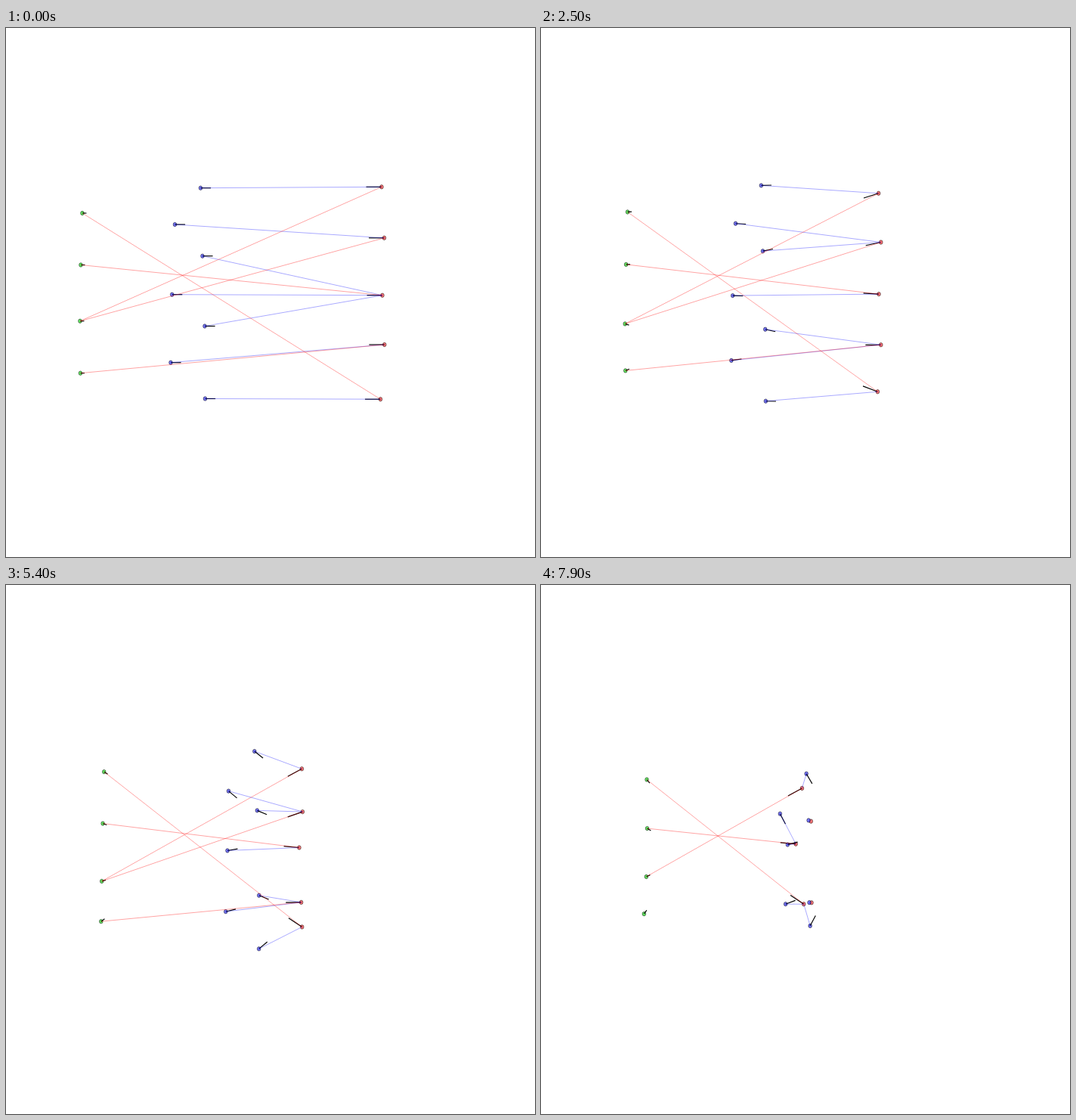
Recreate the animation shown at these times as an HTML page with a canvas. Size 700 by 700 pixels, loop 8 s.

```html
<!DOCTYPE html>
<html>
<head>
<meta charset="utf-8">
<style>
html, body { margin: 0; width: 100%; height: 100%; overflow: hidden; background: #fff; }
canvas { display: block; width: 700px; height: 700px; }
</style>
</head>
<body>
<canvas id="stage" width="700" height="700"></canvas>
<script>
const ctx = document.getElementById('stage').getContext('2d');
const STEPS = 80, STEP_MS = 100, LAST = STEPS - 1;
const ASPECT = 1.17;   // vertical to horizontal scale
const UNIT = 0.68;     // pixels per step at speed 1
const REACH = 5;       // catching distance
const REGROUP = 6;     // step at which the blue agents settle on a quarry

// Each agent: start x, start y, total drop, bow of its path
const green = group(0.8, '0,225,0', [
  [101, 245, 12.5, -55],
  [99, 313.5, 8.6, -29],
  [98, 387.8, -1.8, 75],
  [98.5, 456.7, -21.5, -22]
]);
const blue = group(2, '30,30,255', [
  [257.5, 211.7, 38, -140],
  [223.5, 260, 42.7, -109],
  [260, 301.7, 15.5, -158],
  [219.7, 352.7, -9.1, 45],
  [263, 394.5, 32, 20],
  [218, 442.7, -20.5, -14],
  [263.5, 490.5, -39.5, 140]
]);
// Red agents all turn towards their prey in the same way
const red = group(-3, '255,30,30', [
  [497, 210.3, 58.7],
  [500.5, 277.8, 39.7],
  [498, 353.7, -11],
  [500.8, 419, 1.6],
  [495.5, 491.2, -68.9]
].map(([x, y, drop]) => [x, y, drop, 0.64 * drop]), 0);

const prey = [2, 2, 1, 3, 0];
const firstPick = [0, 1, 2, 2, 2, 3, 4];
const settled = [0, 1, 1, 2, 3, 3, 4];

function group(speed, color, rows, lag = 0.8) {
  return rows.map(([x, y, drop, bow]) => {
    const height = n => {
      const u = n / LAST;
      return y + u * u * (drop + bow * (1 - u - lag * u * (1 - u)));
    };
    return { color, end: Infinity, path: trace(x, height, speed * UNIT) };
  });
}

// Speed is constant, so the vertical motion fixes the sideways motion
function trace(x, height, speed) {
  const path = [];
  const climb = n => height(n + 0.5) - height(n - 0.5);
  const side = vy => Math.sign(speed) * Math.sqrt(Math.max(0, speed ** 2 - (vy / ASPECT) ** 2));
  for (let n = 0; n < STEPS; n++) {
    const vy = n ? climb(n) : 0;
    path.push({ x, y: height(n), vx: side(vy), vy });
    x += side(climb(n + 0.5));
  }
  return path;
}

function at(agent, n) {
  return agent.path[Math.min(n, agent.end)];
}

// A blue agent moves on to the next red one when its own is caught
function quarry(i, n) {
  let k = (n < REGROUP ? firstPick : settled)[i];
  while (k < red.length - 1 && red[k].end < n) k++;
  return red[k];
}

function markCatches() {
  for (let n = 0; n < STEPS; n++) {
    blue.forEach((b, i) => {
      if (b.end < n) return;
      const r = quarry(i, n), p = at(b, n), q = at(r, n);
      if (Math.hypot(p.x - q.x, p.y - q.y) < REACH) b.end = r.end = n;
    });
  }
}

function line(x1, y1, x2, y2, color, width) {
  ctx.strokeStyle = color;
  ctx.lineWidth = width;
  ctx.beginPath();
  ctx.moveTo(x1, y1);
  ctx.lineTo(x2, y2);
  ctx.stroke();
}

function dot(agent, n) {
  const p = at(agent, n);
  ctx.beginPath();
  ctx.ellipse(p.x, p.y, 2.3, 2.3 * ASPECT, 0, 0, Math.PI * 2);
  ctx.fillStyle = `rgba(${agent.color},0.6)`;
  ctx.fill();
  ctx.strokeStyle = 'rgba(0,0,0,0.55)';
  ctx.lineWidth = 0.9;
  ctx.stroke();
  if (n < agent.end) line(p.x, p.y, p.x + 10 * p.vx, p.y + 10 * p.vy, '#000', 1.15);
}

function link(a, b, n, color) {
  if (n >= a.end) return;
  const p = at(a, n), q = at(b, n);
  line(p.x, p.y, q.x, q.y, color, 0.8);
}

function draw(ms) {
  const n = Math.floor(Math.max(0, ms) / STEP_MS) % STEPS;
  ctx.fillStyle = '#fff';
  ctx.fillRect(0, 0, 700, 700);
  [...green, ...red, ...blue].forEach(a => dot(a, n));
  blue.forEach((b, i) => link(b, quarry(i, n), n, 'rgba(0,0,255,0.42)'));
  red.forEach((r, i) => link(r, green[prey[i]], n, 'rgba(255,0,0,0.45)'));
}

markCatches();
let start;
function tick(now) {
  start ??= now;
  draw(now - start);
  requestAnimationFrame(tick);
}
requestAnimationFrame(tick);
</script>
</body>
</html>
```
